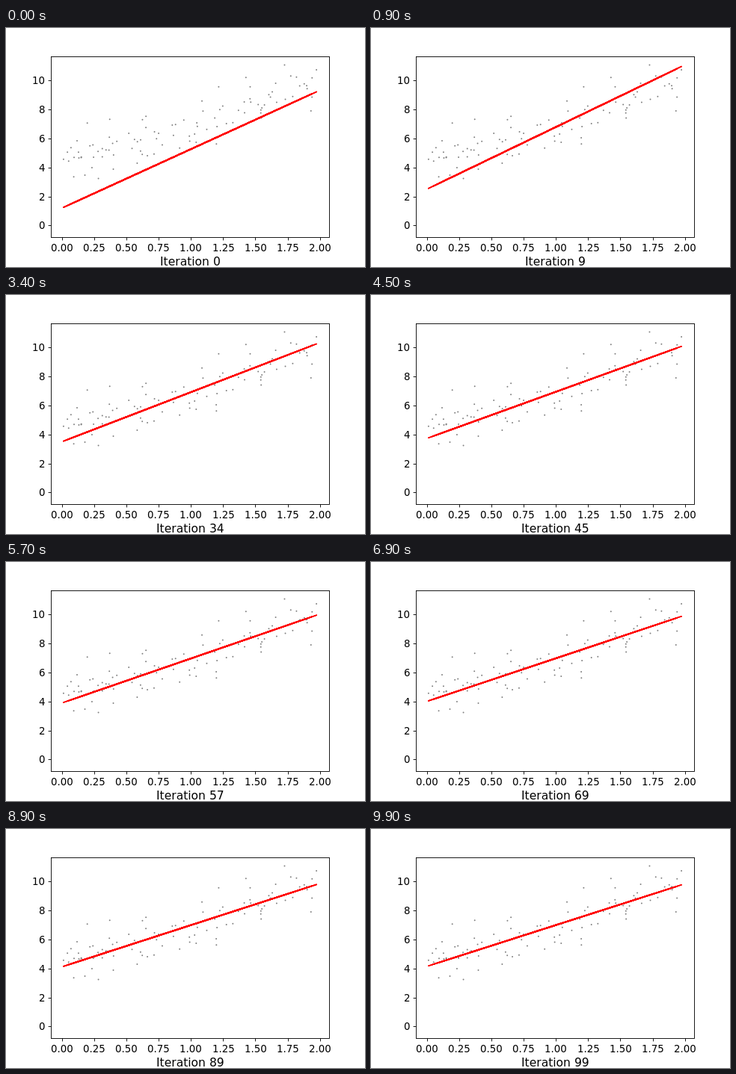
Write an HTML page with a canvas that moves like this. It is 480 px wide and 320 px high and loops after 10 s.

```html
<!DOCTYPE html>
<html lang="en">
<head>
<meta charset="utf-8">
<title>Gradient descent</title>
<style>
  html, body { margin: 0; width: 100%; height: 100%; overflow: hidden; background: #fff; }
  canvas { display: block; }
</style>
</head>
<body>
<canvas id="stage" width="480" height="320"></canvas>
<script>
const ctx = document.getElementById('stage').getContext('2d');
const COUNT = 100, STEPS = 100, STEP_MS = 100, RATE = 0.1;
const FONT = '"DejaVu Sans", sans-serif';
const box = { left: 60, right: 432, top: 38.4, bottom: 280 };

// Mersenne Twister, 32-bit
function twister(seed) {
  const N = 624, s = new Uint32Array(N);
  s[0] = seed;
  for (let i = 1; i < N; i++) {
    s[i] = Math.imul(1812433253, s[i - 1] ^ (s[i - 1] >>> 30)) + i;
  }
  let pos = N;
  return () => {
    if (pos === N) {
      for (let i = 0; i < N; i++) {
        const v = (s[i] & 0x80000000) | (s[(i + 1) % N] & 0x7fffffff);
        s[i] = s[(i + 397) % N] ^ (v >>> 1) ^ (v & 1 ? 0x9908b0df : 0);
      }
      pos = 0;
    }
    let v = s[pos++];
    v ^= v >>> 11;
    v ^= (v << 7) & 0x9d2c5680;
    v ^= (v << 15) & 0xefc60000;
    v ^= v >>> 18;
    return v >>> 0;
  };
}

const next = twister(42);

function uniform() {
  const a = next() >>> 5, b = next() >>> 6;
  return (a * 67108864 + b) / 9007199254740992;
}

let spare = null;
function normal() {
  if (spare !== null) {
    const v = spare;
    spare = null;
    return v;
  }
  let a, b, r;
  do {
    a = 2 * uniform() - 1;
    b = 2 * uniform() - 1;
    r = a * a + b * b;
  } while (r >= 1 || r === 0);
  const f = Math.sqrt(-2 * Math.log(r) / r);
  spare = f * a;
  return f * b;
}

// Noisy samples around y = 4 + 3x
const xs = Array.from({ length: COUNT }, () => 2 * uniform());
const ys = xs.map(x => 4 + 3 * x + normal());

// The first random pair is discarded; the second is the starting guess
normal();
normal();
const start = [normal(), normal()];
const predict = ([a, b], x) => a + b * x;

function descend(theta) {
  let ga = 0, gb = 0;
  xs.forEach((x, i) => {
    const err = predict(theta, x) - ys[i];
    ga += err;
    gb += err * x;
  });
  const k = 2 * RATE / COUNT;
  return [theta[0] - k * ga, theta[1] - k * gb];
}

const fits = [descend(descend(start))];
while (fits.length < STEPS) fits.push(descend(fits[fits.length - 1]));

// Linear scale with a 5% margin around the values
function scale(values, from, to) {
  const lo = Math.min(...values), hi = Math.max(...values);
  const pad = (hi - lo) * 0.05;
  const k = (to - from) / (hi - lo + 2 * pad);
  return v => from + (v - lo + pad) * k;
}
const px = scale(xs, box.left, box.right);
const py = scale(ys.concat(xs.map(x => predict(start, x))), box.bottom, box.top);
const snap = v => Math.floor(v + 0.5) + 0.5;

function segment(x1, y1, x2, y2) {
  ctx.beginPath();
  ctx.moveTo(x1, y1);
  ctx.lineTo(x2, y2);
  ctx.stroke();
}

function label(text, size, x, y, align) {
  ctx.font = `${size}px ${FONT}`;
  const left = x - ctx.measureText(text).width * align;
  ctx.fillText(text, Math.round(left), y);
}

function drawDots() {
  ctx.fillStyle = '#808080';
  xs.forEach((x, i) => {
    ctx.beginPath();
    ctx.arc(px(x), py(ys[i]), 1, 0, 2 * Math.PI);
    ctx.fill();
  });
}

// Samples are joined in their unsorted order, so the edges build up
function drawFit(theta) {
  ctx.strokeStyle = '#f00';
  ctx.lineWidth = 1.667;
  ctx.lineCap = 'round';
  const pts = xs.map(x => [px(x), py(predict(theta, x))]);
  for (let i = 1; i < COUNT; i++) segment(...pts[i - 1], ...pts[i]);
}

function drawAxes() {
  ctx.strokeStyle = ctx.fillStyle = '#000';
  ctx.lineWidth = 0.889;
  ctx.lineCap = 'butt';
  const l = snap(box.left), r = snap(box.right);
  const t = snap(box.top), b = snap(box.bottom);
  ctx.strokeRect(l, t, r - l, b - t);
  for (let i = 0; i <= 8; i++) {
    const v = i / 4, x = snap(px(v));
    segment(x, b, x, b + 3.9);
    label(v.toFixed(2), 13.333, px(v), 299, 0.5);
  }
  for (let v = 0; v <= 10; v += 2) {
    const y = snap(py(v));
    segment(l - 3.9, y, l, y);
    label(String(v), 13.333, 52.2, Math.round(py(v) + 5), 1);
  }
}

function draw(ms) {
  const n = Math.floor(ms / STEP_MS) % STEPS;
  ctx.fillStyle = '#fff';
  ctx.fillRect(0, 0, 480, 320);
  drawDots();
  drawFit(fits[n]);
  drawAxes();
  label('Iteration ' + n, 15.556, 246, 318, 0.5);
}

let origin = null;
function tick(now) {
  if (origin === null) origin = now;
  draw(now - origin);
  requestAnimationFrame(tick);
}
draw(0);
requestAnimationFrame(tick);
</script>
</body>
</html>
```
